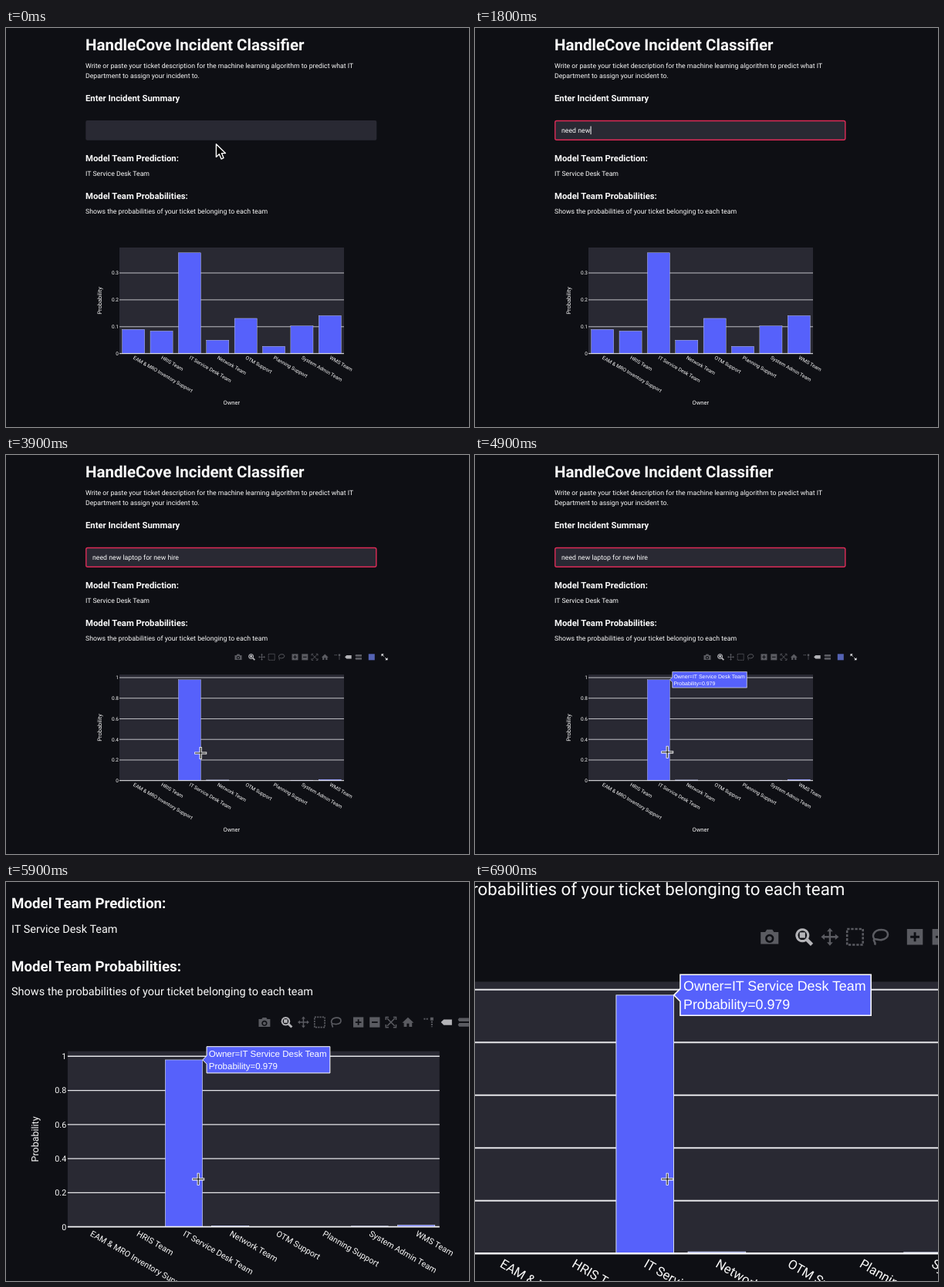
Write an HTML page that moves like this. It is 600 px wide and 518 px high and loops after 7.2 s.

```html
<!DOCTYPE html>
<html lang="en">
<head>
<meta charset="utf-8">
<title>Incident Classifier</title>
<style>
html, body { margin: 0; width: 100%; height: 100%; overflow: hidden; background: #0e0f14; }
svg { display: block; width: 600px; height: 518px; }
text { font-family: Roboto, "Noto Sans", sans-serif; fill: #fafafa; text-rendering: geometricPrecision; white-space: pre; }
.tip text { font-family: "Liberation Sans", Arial, sans-serif; fill: #fff; }
</style>
</head>
<body>
<svg id="stage" viewBox="0 0 600 518"></svg>
<script>
const NS = 'http://www.w3.org/2000/svg';
const LOOP = 7200, STEP = 100;
const BLUE = '#5661fb', PANEL = '#292933', BG = '#0e0f14', RED = '#dc2a56';
const GREY = '#5a5b61', LIT = '#b4b4b8';
const QUERY = 'need new laptop for new hire';
const TEAMS = ['EAM & MRO Inventory Support', 'HRIS Team', 'IT Service Desk Team', 'Network Team',
  'OTM Support', 'Planning Support', 'System Admin Team', 'WMS Team'];
const PLOT = { x: 147, y: 285, w: 291, base: 422.7 };
const BAND = PLOT.w / TEAMS.length;

function add(parent, tag, attrs = {}, content) {
  const el = document.createElementNS(NS, tag);
  for (const k in attrs) el.setAttribute(k, attrs[k]);
  if (content !== undefined) el.textContent = content;
  parent.appendChild(el);
  return el;
}
const label = (parent, x, y, size, str, more) =>
  add(parent, 'text', { x, y, 'font-size': size, ...more }, str);
const show = (el, on) => el.setAttribute('visibility', on ? 'visible' : 'hidden');
const clamp = (v) => Math.max(0, Math.min(1, v));
const smooth = (u) => u * u * (3 - 2 * u);
const mix = (a, b, u) => a + (b - a) * u;

const stage = document.getElementById('stage');
add(stage, 'rect', { width: 600, height: 518, fill: BG });
const view = add(stage, 'g');

// Page text
label(view, 103, 29, 20.5, 'HandleCove Incident Classifier', { 'font-weight': 700 });
label(view, 103, 52, 8.72, 'Write or paste your ticket description for the machine learning algorithm to predict what IT');
label(view, 103, 65, 8.72, 'Department to assign your incident to.');
[['Enter Incident Summary', 95], ['Model Team Prediction:', 173], ['Model Team Probabilities:', 222.3]]
  .forEach(([str, y]) => label(view, 103, y, 11.3, str, { 'font-weight': 600 }));
label(view, 103, 192.2, 8.72, 'IT Service Desk Team');
label(view, 103, 241, 8.72, 'Shows the probabilities of your ticket belonging to each team');

// Input field
add(view, 'rect', { x: 103.3, y: 120, width: 377, height: 25.8, rx: 2, fill: PANEL });
const ring = add(view, 'rect', { x: 103.8, y: 120.5, width: 376, height: 24.8, rx: 2, fill: 'none', stroke: RED, 'stroke-width': 1.4 });
const typed = label(view, 112, 136, 8.75, '');
const caret = add(view, 'rect', { y: 127.5, width: 1, height: 10.6, fill: '#fafafa' });

// Chart
const chart = add(view, 'g');
add(chart, 'rect', { x: PLOT.x, y: PLOT.y, width: PLOT.w, height: PLOT.base - PLOT.y, fill: PANEL });

function plot(values, unit, tick, count) {
  const g = add(chart, 'g');
  for (let i = 0; i <= count; i++) {
    const y = PLOT.base - i * tick * unit;
    if (i) add(g, 'path', { d: `M${PLOT.x} ${y}h${PLOT.w}`, stroke: '#e6e6ea', 'stroke-width': 0.8 });
    label(g, 146, y + 2.3, 6.5, String(+(i * tick).toFixed(1)), { 'text-anchor': 'end' });
  }
  values.forEach((v, i) => {
    if (v) add(g, 'rect', {
      x: PLOT.x + BAND * (i + 0.1), y: PLOT.base - v * unit, width: BAND * 0.8, height: v * unit,
      fill: BLUE, stroke: '#e5ecf6', 'stroke-width': 0.35
    });
  });
  return g;
}
const before = plot([0.09, 0.084, 0.375, 0.05, 0.131, 0.027, 0.103, 0.141], 349, 0.1, 3);
const after = plot([0, 0, 0.979, 0.006, 0, 0, 0.004, 0.011], 133.7, 0.2, 5);
add(chart, 'path', { d: `M${PLOT.x} ${PLOT.base}h${PLOT.w}`, stroke: '#f4f4f6', 'stroke-width': 1 });
TEAMS.forEach((name, i) => {
  const x = PLOT.x + BAND * (i + 0.5) - 1;
  label(chart, 0, 0, 6.5, name, { transform: `translate(${x} 429.3) rotate(30)` });
});
label(chart, 292.3, 489, 7.56, 'Owner', { 'text-anchor': 'middle' });
label(chart, 0, 0, 7.56, 'Probability', { 'text-anchor': 'middle', transform: 'translate(124 354) rotate(-90)' });

// Chart toolbar: icons centred on their own origin
const toolbar = add(view, 'g');
const icon = (x) => add(toolbar, 'g', { transform: `translate(${x} 262.3)` });
const fill = (g, d, c = GREY) => add(g, 'path', { d, fill: c, 'fill-rule': 'evenodd' });
const line = (g, d, w = 1, c = GREY, more = {}) => add(g, 'path', { d, fill: 'none', stroke: c, 'stroke-width': w, ...more });
const square = 'M-4-4h8v8h-8z';

fill(icon(301), 'M-4.5-2.4h2.3l.8-1.3h2.8l.8 1.3h2.3v6h-9zM0-1.4a2.2 2.2 0 1 0 .01 0zM0-.4a1.2 1.2 0 1 1-.01 0z');
const lens = icon(318.5);
line(lens, 'M-.9-3.7a2.9 2.9 0 1 0 .01 0z', 1.2, LIT);
line(lens, 'M1.3 1.3L3.9 3.9', 1.8, LIT);
fill(lens, 'M-2.3-2.3h2.8v2.8h-2.8z', LIT);
const pan = icon(331.5);
line(pan, 'M-3.5 0h7M0-3.5v7', 0.9);
fill(pan, 'M0-4.5l1.5 1.8h-3zM0 4.5l1.5-1.8h-3zM-4.5 0l1.8-1.5v3zM4.5 0l-1.8-1.5v3z');
line(icon(344.2), 'M-4-4h8v8h-8z', 1, GREY, { 'stroke-dasharray': '1.3 .7' });
line(icon(357), 'M-2.6 1.3C-4.6 0-3.6-3.6.6-3.6S5 .9.6 1.5C-1.2 1.8-2.6.6-3.2 1.4S-2 2.6-2.8 4', 1);
const plus = icon(374.5);
fill(plus, square);
line(plus, 'M-2.3 0h4.6M0-2.3v4.6', 1.1, BG);
const minus = icon(387.3);
fill(minus, square);
line(minus, 'M-2.3 0h4.6', 1.1, BG);
const fit = icon(400);
line(fit, 'M-3-3L3 3M3-3L-3 3', 0.9);
line(fit, 'M-4-1.8V-4h2.2M4-1.8V-4H1.8M-4 1.8V4h2.2M4 1.8V4H1.8', 0.9);
fill(icon(413.3), 'M0-3.8L4.5.4H3.2V3.6H.9V1H-.9V3.6H-3.2V.4H-4.5z');
const spike = icon(429.7);
line(spike, 'M-4-2.6h4', 1.2, GREY, { 'stroke-dasharray': '1.2 .8' });
line(spike, 'M2.3-.8v4.6', 1.2, GREY, { 'stroke-dasharray': '1.2 .8' });
fill(spike, 'M1.1-3.8h2.4v2.4H1.1z');
fill(icon(443.6), 'M-4.5 0l2.2-2.2h6.4v4.4h-6.4z', LIT);
fill(icon(456.8), 'M-4.4-2l.9-1.4h7.7v2.8h-7.7zM-4.4 2l.9-1.4h7.7v2.8h-7.7z');
fill(icon(473.8), square, '#5563b4');
const expand = icon(490.5);
line(expand, 'M-3.2-3.2L-.8-.8M.8.8L3.2 3.2', 1, '#f0f0f2');
fill(expand, 'M-4-4h3.2L-4-.8zM4 4H.8L4 .8z', '#f0f0f2');

// Hover label
const tip = add(view, 'g', { class: 'tip' });
add(tip, 'path', { d: 'M252.6 291.8l3.2-3.2v-7.2h96.5v20.7h-96.5v-7.1z', fill: BLUE, stroke: '#fff', 'stroke-width': 0.6 });
label(tip, 257.4, 289.5, 6.96, 'Owner=IT Service Desk Team');
label(tip, 257.4, 298.8, 6.96, 'Probability=0.979');

// Pointers keep their size while the page zooms
const arrow = add(stage, 'path', {
  d: 'M0 0V16.6L3.9 13L6.6 19.2L9.6 17.9L7 11.8H12Z',
  fill: '#000', stroke: '#fff', 'stroke-width': 1.4, 'stroke-linejoin': 'round'
});
const cross = add(stage, 'g');
line(cross, 'M-8 0h16M0-8v16', 3.2, '#fff');
line(cross, 'M-7.2 0h14.4M0-7.2v14.4', 1.1, '#000');

function pointer(t) {
  if (t < 3200) {
    const u = smooth(clamp(t / 400));
    return [mix(272.4, 255.4, u), mix(150.8, 129.8, u)];
  }
  if (t < 3900) {
    const u = smooth((t - 3100) / 800);
    return [mix(255.4, 252.2, u), mix(129.8, 387, u)];
  }
  const u = clamp((t - 3900) / 200);
  return [mix(252.2, 249.2, u), mix(387, 385.8, u)];
}

function caretOn(t) {
  if (t < 600) return false;
  if (t < 1700) return t < 1200;
  if (t < 2700) return true;
  if (t < 3200) return false;
  return t >= 5200 ? t < 5800 : Math.floor((t - 3200) / 500) % 2 === 0;
}

function draw(t) {
  // Zoom around the hovered bar
  const u = clamp((t - 5594) / 806);
  const s = 1 + 1.562 * (1 - Math.pow(1 - u * u, 3.5));
  view.setAttribute('transform', `translate(249.3 384.6) scale(${s}) translate(-249.3 -384.6)`);

  ring.setAttribute('opacity', clamp((t - 500) / 200));
  const n = t < 1700 ? 0 : Math.min(QUERY.length, ((t - 1700) / STEP + 1) * 4);
  typed.textContent = QUERY.slice(0, n);
  const end = n ? typed.getComputedTextLength() : 0;
  caret.setAttribute('x', 112.3 + end);
  show(caret, caretOn(t));

  const fresh = t >= 2900;
  show(before, !fresh);
  show(after, fresh);
  chart.setAttribute('opacity', fresh ? 1 : 1 - 0.13 * clamp((t - 2400) / 400));

  const [x, y] = pointer(t);
  const inPlot = y > PLOT.y;
  for (const el of [arrow, cross]) el.setAttribute('transform', `translate(${x} ${y})`);
  show(arrow, !inPlot && (t < 1700 || t >= 3200));
  show(cross, inPlot);
  show(toolbar, y > 250);
  show(tip, t >= 4100);
}

const start = performance.now();
function frame() {
  const t = (performance.now() - start) % LOOP;
  draw(Math.floor(t / STEP) * STEP);
  requestAnimationFrame(frame);
}
frame();
</script>
</body>
</html>
```
